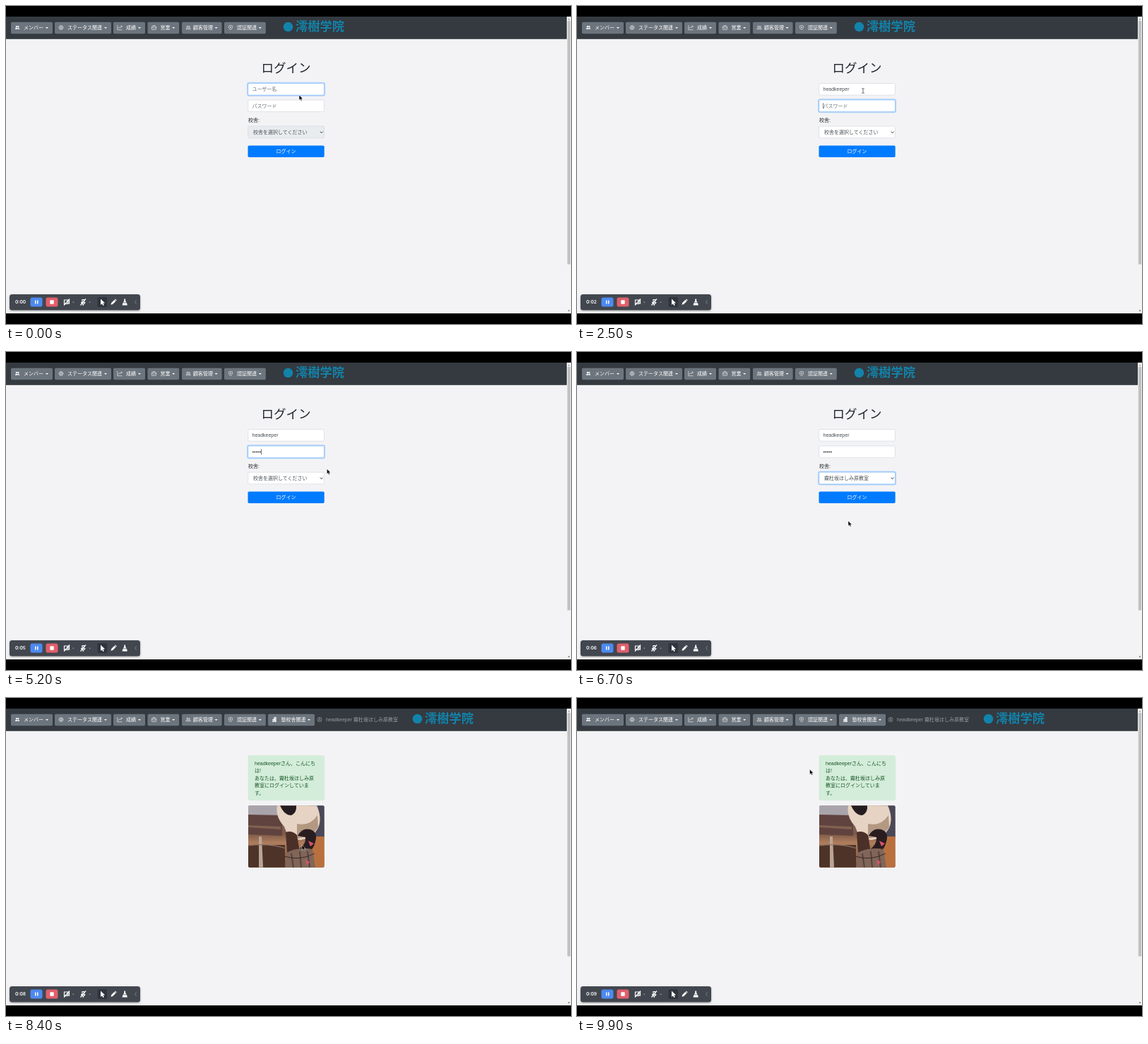
Write an HTML page that moves like this. It is 800 px wide and 450 px high and loops after 10 s.

```html
<!DOCTYPE html>
<html lang="ja">
<head>
<meta charset="utf-8">
<title>ログイン</title>
<style>
html, body { margin: 0; width: 100%; height: 100%; overflow: hidden; background: #000; }
svg { display: block; width: 800px; height: 450px; }
text { font: 7px "Liberation Sans", "Noto Sans CJK JP", "Noto Sans CJK", sans-serif; white-space: pre; }
.line { fill: none; stroke: #fff; stroke-width: 1.3; }
.white { fill: #fff; }
</style>
</head>
<body>
<svg id="stage" viewBox="0 0 800 450" xmlns="http://www.w3.org/2000/svg"></svg>
<script>
const USER = 'headkeeper';
const ROOM = '霧杜坂ほしみ原教室';
const LOOP = 10000;

const rect = (x, y, w, h, fill, more = '') =>
  `<rect x="${x}" y="${y}" width="${w}" height="${h}" fill="${fill}" ${more}/>`;
const text = (x, y, s, fill, more = '') =>
  `<text x="${x}" y="${y}" fill="${fill}" ${more}>${s}</text>`;
const path = (d, fill, more = '') => `<path d="${d}" fill="${fill}" ${more}/>`;

// Icons live in a 16 x 16 box
const icons = {
  members: '<g class="white"><circle cx="5.5" cy="5" r="2.6"/><circle cx="11" cy="5" r="2.6"/><path d="M1 13c0-6 9-6 9 0zM11 13c0-2-.5-3-1.3-4 3-.8 5.5.8 5.5 4z"/></g>',
  gear: '<g class="line"><circle cx="8" cy="8" r="2.5"/><circle cx="8" cy="8" r="5.6"/><circle cx="8" cy="8" r="7" stroke-dasharray="2.75"/></g>',
  graph: '<path class="line" d="M.7 0V15.3H16M3 11l4-5 3 3 5-6M11 3h4v4"/>',
  bag: '<g class="line"><rect x=".8" y="4" width="14.4" height="10.5" rx="1.5"/><path d="M5 4V1.8h6V4M1 7.5l7 2.3 7-2.3"/></g>',
  people: '<g class="line"><circle cx="5.5" cy="5" r="2.4"/><circle cx="11.5" cy="5.5" r="2"/><path d="M1 13c0-5.500 9-5.500 9 0zM10 9c3-1 5.300 1 5.300 4H10"/></g>',
  shield: '<g class="line"><path d="M8 .8l5.800 2C14.500 9 12 13.500 8 15.300 4 13.500 1.500 9 2.200 2.800z"/><circle cx="8" cy="6.500" r="1.400"/><path d="M8 8v3"/></g>',
  building: '<path class="white" fill-rule="evenodd" d="M2 16V7l5-2V0h7v16H9v-3H7v3zM4 8v2h1.500V8zM4 11v2h1.500v-2zM9 2v2h1.200V2zM11.500 2v2h1.200V2zM9 6v2h1.200V6zM11.500 6v2h1.200V6zM9 10v2h1.200v-2zM11.500 10v2h1.200v-2z"/>',
  user: '<g class="line" opacity=".55"><circle cx="8" cy="8" r="7.200"/><circle cx="8" cy="6" r="2.600"/><path d="M3 13c1.500-4 8.500-4 10 0"/></g>'
};
const icon = (name, cx) =>
  `<g transform="translate(${cx - 3.5} 27) scale(.4375)">${icons[name]}</g>`;

function navButton(x, w, name, label, iconX, labelX) {
  const end = x + w - 8;
  return rect(x, 22.8, w, 16.4, '#6c757d', 'rx="1.8"') + icon(name, iconX) +
    text(labelX, 33.1, label, '#fff') + path(`M${end - 2} 30h4l-2 2z`, '#fff');
}

const field = (id, y) =>
  rect(342.75, y, 107.7, 16.6, '#fff', `id="${id}" rx="1.8" stroke-width=".6"`) +
  rect(341.8, y - .9, 109.6, 18.4, 'none', `id="${id}Ring" rx="2.5" stroke="#007bff" stroke-opacity=".27" stroke-width="1.5"`);

const logo = `<g id="logo"><circle cx="399.5" cy="29.5" r="6.8" fill="#1283ab"/>` +
  text(410, 35.3, '澪樹学院', '#1283ab', 'style="font-size:17.3px;font-weight:700"') + '</g>';

const login = '<g id="login">' +
  text(396.6, 94.3, 'ログイン', '#212529', 'text-anchor="middle" style="font-size:17.5px"') +
  field('name', 109.5) + field('pass', 133) + field('room', 170.2) +
  text(348.5, 120.2, '', '#495057', 'id="nameText"') +
  text(348.5, 143.7, '', '#495057', 'id="passText"') +
  '<g id="dots" fill="#333"></g>' +
  text(343, 163.7, '校舎:', '#212529') +
  text(350, 181.2, '', '#495057', 'id="roomText"') +
  path('M444.800 177.700l1.900 2 1.900-2', 'none', 'stroke="#333" stroke-width="1"') +
  rect(342.5, 197.4, 108.2, 16.6, '#007bff', 'id="send" rx="1.8"') +
  text(396.6, 208.2, 'ログイン', '#fff', 'text-anchor="middle"') +
  rect(0, 0, .6, 8, '#111', 'id="caret"') + '</g>';

const photo = '<g clip-path="url(#frame)">' +
  rect(343, 152, 108, 88, 'url(#field)') +
  rect(343, 152, 44, 14, '#a9a4ab') +
  path('M343 165l48 1v29l-48-2z', '#60433e') +
  path('M430 152h21v45h-21z', '#4a4858') +
  path('M343 180l46 2v4l-46-3z', '#80604f') +
  path('M343 208h52v32h-52z', '#4e3328') +
  path('M358 196h4l2 44h-6z', '#b9a595') +
  path('M343 209q28-4 54 4', 'none', 'stroke="#8d7464" stroke-width="1.2"') +
  path('M434 196h17v44h-17z', '#b9703f') +
  path('M384 152h56q8 18 2 32l-9 13-16 4-17-3-6-16q-13-14-10-30z', '#e6d3c3') +
  path('M412 178q18 4 29-12l1 17-10 12-20 4z', '#b39882') +
  path('M388 152h23q1 10-7 14-10 0-16-14z', '#251c20') +
  path('M396 190q9-3 16 4l4 24-18 2z', '#4b3028') +
  path('M413 195q6-12 18-9 11 4 7 17-3 14-13 15l-10-4q10-7 9-17z', '#291d20') +
  path('M397 219q18-9 37-5l4 26h-42z', '#806659') +
  path('M404 220l3 20M416 217l2 23M427 217l3 23', 'none', 'stroke="#584239" stroke-width="2"') +
  path('M394 224q22 7 43-4', 'none', 'stroke="#39292a" stroke-width="1"') +
  path('M428 202l8 4-5 4zM424 229l6 3-4 5z', '#d6536d') + '</g>';

const home = '<g id="home">' +
  navButton(371, 66, 'building', '塾校舎関連', 380, 389.5) + icon('user', 444) +
  text(453, 33.1, `${USER} ${ROOM}`, '#999da0') +
  rect(343, 81.6, 107.6, 63, '#d4edda', 'rx="1.8" stroke="#c3e6cb" stroke-width=".5"') +
  [`${USER}さん、こんにち`, 'は!', 'あなたは、' + ROOM.slice(0, 7), ROOM.slice(7) + 'にログインしていま', 'す。']
    .map((s, i) => text(352, 94.5 + i * 10.5, s, '#155724')).join('') +
  photo + '</g>';

const toolbar = rect(5, 408, 185, 22.5, '#434750', 'rx="3.5" filter="url(#soft)"') +
  text(13, 421.4, '', '#fff', 'id="clock" style="font-family:Inter,sans-serif;font-size:6.6px;font-weight:600"') +
  rect(34.5, 412.5, 17, 13, '#4d8af0', 'rx="2.5"') +
  rect(41, 416.5, 1.5, 5, '#fff') + rect(44, 416.5, 1.5, 5, '#fff') +
  rect(56.5, 412.5, 17, 13, '#e0606b', 'rx="2.5"') + rect(62.3, 416.3, 5.4, 5.4, '#fff', 'rx=".6"') +
  rect(129.5, 412, 13.5, 14, '#30343c', 'rx="2"') +
  '<g fill="none" stroke="#fff" stroke-width="1.2">' +
  '<path d="M82.500 416h5v5.500h-5zM87.500 418l2-1.500v4.500l-2-1M82 423.500l8-9"/>' +
  '<path d="M108 415.500h2.400v4H108zM106.500 419c.500 3.500 5 3.500 5.500 0M109.200 421.500v2.500M105.500 423.500l7.500-9"/></g>' +
  path('M94 418.800h2.400l-1.200 1.300zM117.500 418.800h2.400l-1.200 1.300z', '#bbb') +
  path('M134 414.500v8.500l2-1.700 1.300 2.600 1.500-.700-1.300-2.600 2.700-.200z', '#fff') +
  path('M148.500 422.800l.700-2.800 4.300-4.300 2 2-4.300 4.300zM154 415.200l.800-.800 2 2-.800.800z', '#fff') +
  path('M167.300 414.500h1.800v2.500l1.500 2.500h-4.800l1.500-2.500zM165.300 420.200h5.800l.700 3.300h-7.200z', '#fff') +
  path('M184.600 416.200l-2 2.800 2 2.800', 'none', 'stroke="#888d96" stroke-width=".8"');

const cursors = '<g id="arrow">' +
  path('M0 0v7.200l1.700-1.500 1.200 2.500 1.300-.600-1.200-2.400h2.300z', '#000', 'stroke="#fff" stroke-width=".5"') + '</g>' +
  '<g id="beam">' + path('M-1.700-3.500q1.500 0 1.700.8.200-.8 1.700-.8M0-2.700v5.400M-1.700 3.500q1.500 0 1.700-.8.200.8 1.700.8', 'none', 'stroke="#222" stroke-width=".7"') + '</g>' +
  '<g id="hand">' + path('M0 .700q.700-1 1.300 0v2.800l3 .700q.700.300.500 1.400l-.700 2.700H.900L-1.200 5.200q.200-1 1.200-.200z', '#fff', 'stroke="#111" stroke-width=".6"') + '</g>';

const stage = document.getElementById('stage');
stage.innerHTML = `<defs>
  <clipPath id="frame"><rect x="343" y="152.300" width="107.600" height="87.500" rx="2"/></clipPath>
  <linearGradient id="field" x1="0" y1="0" x2="0" y2="1">
    <stop offset="0" stop-color="#8d7c7c"/><stop offset=".45" stop-color="#7b5848"/><stop offset=".6" stop-color="#ae7d5c"/><stop offset="1" stop-color="#80513a"/>
  </linearGradient>
  <filter id="soft" x="-10%" y="-40%" width="120%" height="200%"><feDropShadow dx="0" dy="1" stdDeviation="1.500" flood-opacity=".3"/></filter>
</defs>` +
  rect(0, 0, 800, 450, '#000') + rect(0, 15, 800, 420, '#f3f3f5') + rect(0, 15, 794, 31.8, '#343a40') +
  rect(794, 15, 6, 420, '#f4f4f4') + rect(794.8, 21, 4.4, 344.5, '#c1c1c1') +
  path('M795.500 19.500h3l-1.500-1.800z', '#888') + path('M795.500 430.500h3l-1.500 1.800z', '#505050') +
  navButton(7, 59, 'members', 'メンバー', 16, 25) +
  navButton(69, 80, 'gear', 'ステータス関連', 78, 87) +
  navButton(152, 45, 'graph', '成績', 161, 170) +
  navButton(200.5, 44.7, 'bag', '営業', 209.5, 218.5) +
  navButton(249, 56.6, 'people', '顧客管理', 258, 265) +
  navButton(309, 58.8, 'shield', '認証関連', 318, 327) +
  logo + login + home + toolbar + cursors;

const el = id => document.getElementById(id);
const show = (id, on) => el(id).setAttribute('display', on ? 'inline' : 'none');
const set = (id, name, value) => el(id).setAttribute(name, value);

const typedAt = [1100, 1300, 1300, 1400, 1600, 1700, 1900, 2000, 2100, 2200];
const dotsAt = [3700, 3800, 3900, 4000, 4100];
const count = (times, t) => times.filter(at => at <= t).length;

// time, x, y
const route = [
  [0, 415, 126], [300, 405, 120], [4600, 405, 120],
  [4600, 505, 98], [5400, 445, 178], [6300, 445, 178],
  [6300, 384, 239], [6700, 384, 239], [7300, 409, 204.5], [7700, 409, 204.5],
  [8200, 419, 208], [8400, 419, 208], [8800, 444, 186], [9300, 404, 148],
  [9800, 329.5, 101], [LOOP, 329.5, 101]
];

function pointer(t) {
  const i = route.findIndex((p, k) => t >= p[0] && t < route[k + 1][0]);
  const [a, x, y] = route[i], [b, x2, y2] = route[i + 1];
  const k = (t - a) / (b - a), e = k * k * (3 - 2 * k);
  return [x + (x2 - x) * e, y + (y2 - y) * e];
}

function cursorKind(t, x, y) {
  if (t >= 3000 && t < 4600) return '';
  if (t >= 7700 || x < 343 || x > 450) return 'arrow';
  if (y > 197 && y < 214) return 'hand';
  const overInput = (y > 109 && y < 126) || (y > 133 && y < 150);
  return overInput ? 'beam' : 'arrow';
}

function focusAt(t) {
  if (t < 2300) return 'name';
  if (t < 5500) return 'pass';
  return t < 7300 ? 'room' : '';
}

function caretOn(t) {
  if (t < 1100) return t >= 500 && t < 1000;
  if (t < 2300) return true;
  if (t < 3700) return t < 2800 || t >= 3300;
  return t < 4600 || (t >= 5100 && t < 5500);
}

function draw(t) {
  const inside = t >= 7700;
  const focus = focusAt(t);
  const name = USER.slice(0, count(typedAt, t));
  const dots = count(dotsAt, t);
  const locked = t < 2500;

  show('login', !inside);
  show('home', inside);
  set('logo', 'transform', `translate(${inside ? 183 : 0} 0)`);
  el('clock').textContent = '0:0' + Math.floor(t / 1000);

  for (const id of ['name', 'pass', 'room']) {
    set(id, 'stroke', id === focus ? '#80bdff' : '#ced4da');
    show(id + 'Ring', id === focus);
  }
  set('room', 'fill', locked ? '#e9ecef' : '#fff');
  el('nameText').textContent = name || 'ユーザー名';
  set('nameText', 'fill', name ? '#495057' : '#6c757d');
  el('passText').textContent = dots ? '' : 'パスワード';
  set('passText', 'fill', '#6c757d');
  el('dots').innerHTML = Array.from({ length: dots }, (_, i) =>
    `<circle cx="${349.8 + i * 2.5}" cy="141.400" r=".950"/>`).join('');
  el('roomText').textContent = t < 5700 ? '校舎を選択してください' : ROOM;

  const [x, y] = pointer(t);
  const kind = cursorKind(t, x, y);
  for (const id of ['arrow', 'beam', 'hand']) show(id, id === kind);
  if (kind) set(kind, 'transform', `translate(${x} ${y})`);
  set('send', 'fill', kind === 'hand' ? '#0f69d3' : '#007bff');

  show('caret', caretOn(t));
  if (!inside) {
    const onName = focus === 'name';
    const width = onName ? (name ? el('nameText').getComputedTextLength() : 0) : dots * 2.5;
    set('caret', 'x', 348.5 + width);
    set('caret', 'y', onName ? 113.8 : 137.3);
  }
}

const start = performance.now();
function tick() {
  const t = (performance.now() - start) % LOOP;
  draw(Math.floor(t / 100) * 100);
  requestAnimationFrame(tick);
}
tick();
</script>
</body>
</html>
```
